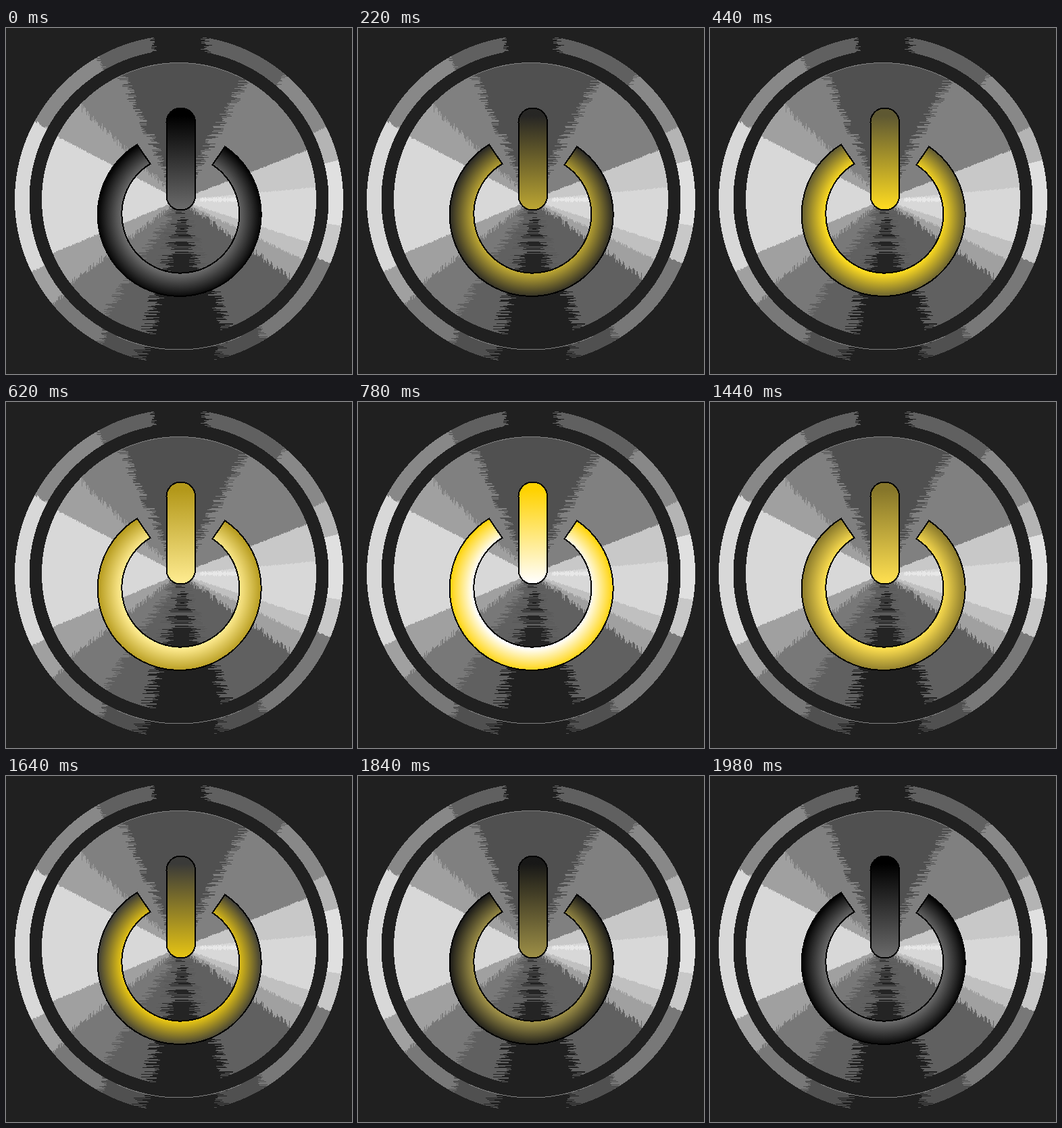
An HTML page with a canvas for the animation above (2380 ms loop, 512x512 px).

```html
<!DOCTYPE html>
<html lang="en">
<head>
<meta charset="utf-8">
<title>Power button</title>
<style>
html, body { margin: 0; width: 100%; height: 100%; overflow: hidden; background: #202020; }
canvas, svg { position: absolute; left: 0; top: 0; width: 100%; height: 100%; display: block; }
canvas { image-rendering: pixelated; }
.rim { animation: rim 2380ms -1ms infinite; }
.core { animation: core 2380ms -1ms infinite; }
@keyframes rim {
  0% { stop-color: #000; animation-timing-function: steps(17); }
  14.2857% { stop-color: #3c3b38; animation-timing-function: steps(5); }
  18.4874% { stop-color: #5e5832; animation-timing-function: steps(4); }
  21.8487% { stop-color: #84742a; animation-timing-function: steps(13); }
  32.7731%, 49.5798% { stop-color: #ffd200; animation-timing-function: steps(13); }
  60.5042% { stop-color: #86762a; animation-timing-function: steps(5); }
  64.7059% { stop-color: #5c5632; animation-timing-function: steps(5); }
  68.9076% { stop-color: #3a3a38; animation-timing-function: steps(17); }
  83.1933%, 100% { stop-color: #000; }
}
@keyframes core {
  0% { stop-color: #6a6a6a; animation-timing-function: steps(17); }
  14.2857% { stop-color: #e8c614; animation-timing-function: steps(5); }
  18.4874% { stop-color: #ffdc20; animation-timing-function: steps(4); }
  21.8487% { stop-color: #ffe04c; animation-timing-function: steps(13); }
  32.7731%, 49.5798% { stop-color: #fff; animation-timing-function: steps(13); }
  60.5042% { stop-color: #ffe050; animation-timing-function: steps(5); }
  64.7059% { stop-color: #fcda1e; animation-timing-function: steps(5); }
  68.9076% { stop-color: #e6c414; animation-timing-function: steps(17); }
  83.1933%, 100% { stop-color: #6a6a6a; }
}
</style>
</head>
<body>
<canvas width="512" height="512"></canvas>
<svg viewBox="0 0 512 512">
  <defs>
    <linearGradient id="bar" gradientUnits="userSpaceOnUse" x1="0" y1="130" x2="0" y2="268">
      <stop class="rim" offset="0"/><stop class="core" offset="1"/>
    </linearGradient>
    <radialGradient id="arc" gradientUnits="userSpaceOnUse" cx="257" cy="278" r="122">
      <stop class="core" offset=".71"/><stop class="rim" offset="1"/>
    </radialGradient>
  </defs>
  <path d="M206 386A122.5 122.5 0 0 0 308 386" fill="none" stroke="#707070"/>
  <g stroke="#000" stroke-width="2" shape-rendering="crispEdges">
    <path fill="url(#arc)" d="M194 172.500A121 121 0 1 0 324 175.500L305.500 202.500A87 87 0 1 1 213.500 201Z"/>
    <rect fill="url(#bar)" x="237.500" y="118.500" width="42.500" height="151" rx="21"/>
  </g>
</svg>
<script>
const SIZE = 512, CX = 256, CY = 254, TURN = Math.PI * 2;
const ctx = document.querySelector('canvas').getContext('2d');

let seed = 71;
const rand = () => (seed = seed * 16807 % 2147483647) / 2147483647;
const noise = () => Array.from({ length: SIZE }, rand);
const angle = (x, y) => (Math.atan2(x - CX, CY - y) + TURN) % TURN;

// Each wedge: point on its leading edge, grey level, edge roughness in px.
const wedge = ([x, y, grey, rough]) => ({ a: angle(x, y), grey, rough, jag: noise() });

const disc = [
  [353, 76, 128, 9], [446, 180, 200, 1], [459, 235, 216, 1],
  [452, 318, 192, 1], [438, 342, 160, 2], [420, 368, 96, 5],
  [327, 443, 32, 11], [210, 448, 96, 13], [150, 418, 120, 8],
  [100, 373, 160, 4], [70, 332, 216, 1], [75, 160, 160, 1],
  [108, 115, 128, 5], [172, 72, 80, 8]
].map(wedge);

const ring = [
  [296, 22, 96, 11], [412, 72, 136, 4], [468, 148, 180, 1],
  [488, 196, 224, 0], [488, 291, 200, 0], [473, 345, 120, 1],
  [378, 452, 80, 6], [318, 478, 32, 14], [200, 482, 80, 14],
  [143, 456, 120, 7], [75, 402, 160, 3], [46, 356, 216, 1],
  [50, 142, 136, 2], [140, 50, 96, 4], [216, 20, 32, 5]
].map(wedge);

const streak = noise(), gaps = noise(), widths = noise();

function shade(wedges, x, y, r) {
  const a = angle(x, y);
  const line = Math.abs(y - CY) > Math.abs(x - CX) ? y : x;
  let grey = wedges[wedges.length - 1].grey;
  for (const w of wedges)
    if (a >= w.a + w.rough * (w.jag[line] * 2 - 1) / Math.max(r, 30)) grey = w.grey;
  return grey;
}

function hub(x, y, r, grey) {
  if (x > 286 && x < 346 && Math.abs(y - CY + 0.5) < 1 + streak[x] * 3) return 232;
  if (y > CY + 10 && r < 108 && grey === 32) {
    const depth = (y - CY) / 100;
    const half = (0.25 + widths[y]) * 26 * depth + 4;
    return gaps[y] < depth + 0.1 && Math.abs(x - 259) < half ? 36 : 90;
  }
  return grey;
}

function pixel(x, y) {
  const r = Math.hypot(x - CX + 0.5, y - CY + 0.5);
  if (r < 203) {
    if (r > 202 && y < 75) return 128;
    return hub(x, y, r, shade(disc, x, y, r));
  }
  if (r > 221.5 && r < 243) {
    if (r < 222.5 && y > 455) return 128;
    return shade(ring, x, y, r);
  }
  return 32;
}

const img = ctx.createImageData(SIZE, SIZE);
for (let y = 0, i = 0; y < SIZE; y++)
  for (let x = 0; x < SIZE; x++, i += 4) {
    img.data.fill(pixel(x, y), i, i + 3);
    img.data[i + 3] = 255;
  }
ctx.putImageData(img, 0, 0);
</script>
</body>
</html>
```
